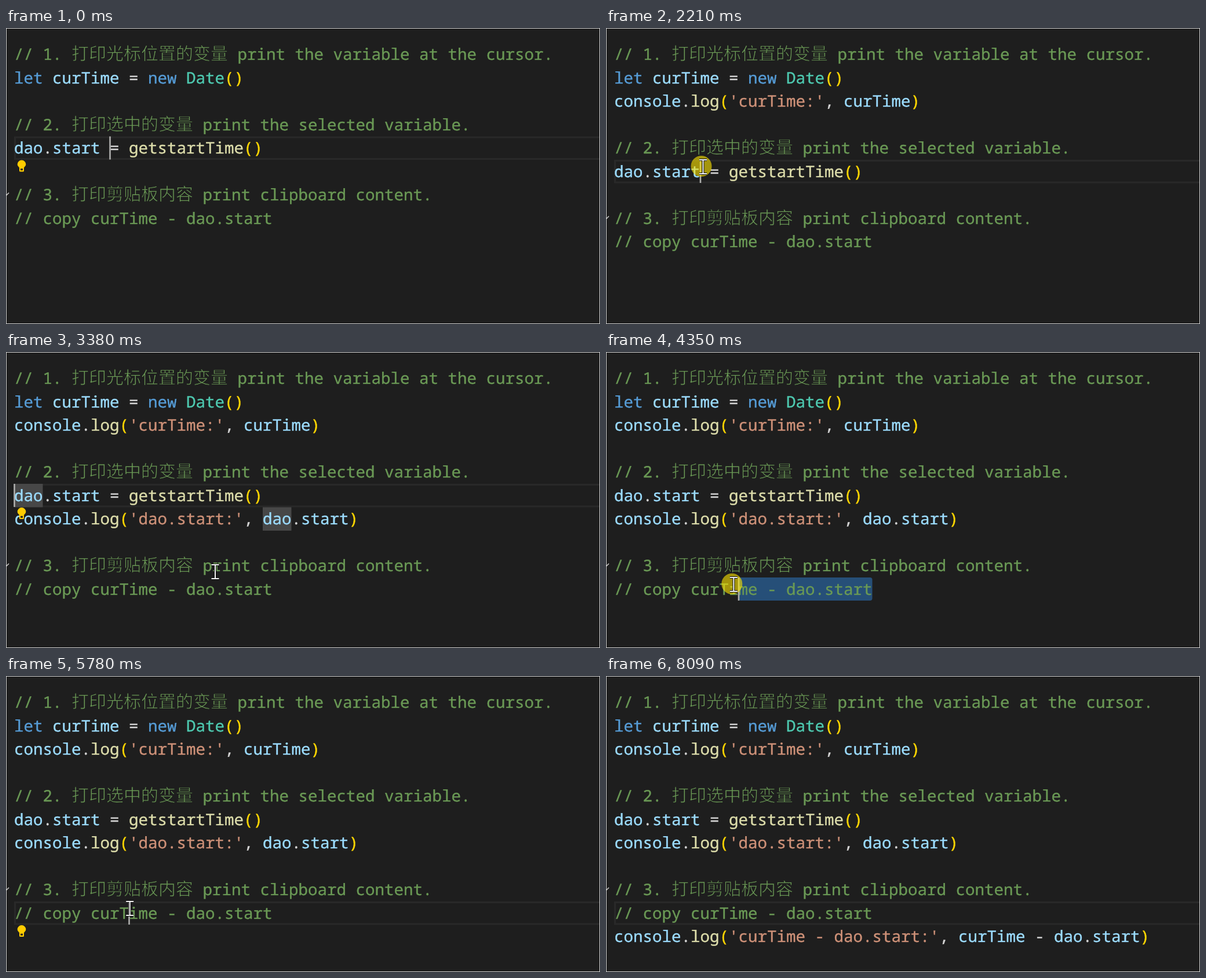
Recreate the animation shown at these times as an HTML page. Size 1025 px wide and 512 px high, loop 8680 ms.

```html
<!DOCTYPE html>
<html lang="zh">
<head>
<meta charset="utf-8">
<title>Print variables</title>
<style>
  html, body { margin: 0; width: 100%; height: 100%; overflow: hidden; background: #1e1e1e; }
  svg { display: block; width: 100%; height: 100%; }
  text {
    font: 27.5px "Noto Sans Mono", "DejaVu Sans Mono", monospace;
    white-space: pre;
    text-rendering: geometricPrecision;
  }
  tspan { fill: currentColor; stroke: currentColor; stroke-width: .4px; }
  /* the background-coloured outline thins the strokes */
  .cjk { font: 300 30px "Noto Sans CJK SC", "Noto Sans CJK", sans-serif; stroke: #1e1e1e; stroke-width: .8px; }
  .comment, .cjk { color: #6a9955; }
  .keyword { color: #569cd6; }
  .type { color: #4ec9b0; }
  .call { color: #dcdcaa; }
  .name { color: #9cdcfe; }
  .string { color: #ce9178; }
  .paren { color: #ffd700; }
  .plain { color: #d4d4d4; }
</style>
</head>
<body>
<svg id="stage" viewBox="0 0 1025 512"></svg>
<script>
const LOOP = 8680, FRAME = 69;
const LEFT = 14, CHAR = 16.5, TOP = 25.5, ROW = 40.5;
const DRAG_SPEED = .445;  // px per ms
const CLICK = 140;        // shortest time the button is held
const DELAY = 270;        // wait for the light bulb and word marks
const HOTSPOT = { x: 5, y: 12 };

const code = text => ({ text, born: 0 });
const log = (value, born) => ({ text: `console.log('${value}:', ${value})`, born });
const LINES = [
  code("// 1. 打印光标位置的变量 print the variable at the cursor."),
  code("let curTime = new Date()"),
  log("curTime", 1520),
  code(""),
  code("// 2. 打印选中的变量 print the selected variable."),
  code("dao.start = getstartTime()"),
  log("dao.start", 2910),
  code(""),
  code("// 3. 打印剪贴板内容 print clipboard content."),
  code("// copy curTime - dao.start"),
  log("curTime - dao.start", 6590)
];

// Presses of the button: the mouse is dragged through cols, then rests until leave.
const START = { at: -800, line: 5, cols: [10] };
const PRESSES = [
  { at: 690, line: 1, cols: [9], leave: 830 },
  { at: 2210, line: 5, cols: [9, 0], leave: 2770 },
  { at: 3800, line: 9, cols: [27, 4.8, 8], leave: 5290 },
  { at: 5640, line: 9, cols: [11.8], leave: 5920 }
];

// Where the mouse goes between presses: [time, x, y]
const WANDER = [
  [130, 796, 426], [1240, 244, 143], [3380, 361, 380],
  [6120, 241, 404], [6990, 241, 404], [7550, 1000, 488]
];

const colX = col => LEFT + col * CHAR;
const snap = col => Math.ceil(col - .05);
const topOf = (line, t) => TOP + ROW * LINES.slice(0, line).filter(l => l.born <= t).length;

function dragPoints(press) {
  const { cols, line, leave } = press;
  const y = topOf(line, press.at) + HOTSPOT.y;
  let t = press.at;
  const points = cols.map((col, i) => {
    if (i) t += Math.abs(col - cols[i - 1]) * CHAR / DRAG_SPEED;
    return [t, colX(col) + HOTSPOT.x, y];
  });
  press.end = t;
  return [...points, [leave, points.at(-1)[1], y]];
}
START.end = START.at;
const PATH = [...WANDER, ...PRESSES.flatMap(dragPoints)].sort((a, b) => a[0] - b[0]);
const MOUSE_OUT = PATH.at(-1)[0] + FRAME;

// The mouse advances in screen-capture steps along straight pieces.
function mouseAt(t) {
  const i = Math.max(0, PATH.findLastIndex(k => k[0] <= t));
  const a = PATH[i], b = PATH[i + 1];
  if (!b || t < a[0]) return a.slice(1);
  const span = b[0] - a[0];
  const n = Math.max(1, Math.round(span / FRAME));
  const p = Math.floor((t - a[0]) / span * n + 1e-6) / n;
  return [a[1] + (b[1] - a[1]) * p, a[2] + (b[2] - a[2]) * p];
}

function editorAt(t) {
  const press = PRESSES.findLast(p => p.at <= t) || START;
  const { line, cols, end } = press;
  const dragging = t < end;
  const anchor = snap(cols[0]);
  const inserted = Math.max(...LINES.map(l => l.born <= t ? l.born : 0));
  const raw = dragging ? (mouseAt(t)[0] - HOTSPOT.x - LEFT) / CHAR : cols.at(-1);
  const col = Math.min(anchor, snap(raw));
  return {
    line, col, anchor, dragging,
    selected: col < anchor && inserted < press.at,
    since: inserted > end ? inserted : end
  };
}

function tokens(text) {
  if (text.startsWith("//")) {
    return text.split(/([\u4e00-\u9fff]+)/).map((s, i) => [i % 2 ? "cjk" : "comment", s]);
  }
  const parts = text.match(/'[^']*'|\w+\(?|[()]|[^\w'()]+/g) || [];
  return parts.flatMap(s => {
    if (s[0] === "'") return [["string", s]];
    if (/^[()]$/.test(s)) return [["paren", s]];
    if (/^(let|new)$/.test(s)) return [["keyword", s]];
    if (s.endsWith("(")) {
      const name = s.slice(0, -1);
      return [[name === "Date" ? "type" : "call", name], ["paren", "("]];
    }
    return [[/^\w/.test(s) ? "name" : "plain", s]];
  });
}

const stage = document.getElementById("stage");
function set(node, attrs) {
  for (const key in attrs) node.setAttribute(key, attrs[key]);
  return node;
}
function add(tag, attrs, parent = stage) {
  const node = document.createElementNS("http://www.w3.org/2000/svg", tag);
  return parent.appendChild(set(node, attrs));
}
const show = (node, on) => { node.style.display = on ? "" : "none"; };

// Layers, back to front
const current = add("rect", { x: 15.5, width: 1020, height: 37.5, fill: "none", stroke: "#292929", "stroke-width": 3 });
const marks = add("g", {});
const selection = add("rect", { height: 40, rx: 4, fill: "#264f78" });
const names = [];
const lines = LINES.map(({ text }, line) => {
  const node = add("text", {});
  let x = LEFT, col = 0;
  for (const [kind, s] of tokens(text)) {
    add("tspan", { class: kind, x }, node).textContent = s;
    if (kind === "name") {
      const fill = text.startsWith("let") ? "#083d5a" : "#474747";
      const box = add("rect", { x, width: s.length * CHAR, height: ROW, fill }, marks);
      names.push({ word: s, line, col, box });
    }
    x += s.length * (kind === "cjk" ? 30 : CHAR);
    col += s.length;
  }
  return node;
});
const chevron = add("path", { d: "M0 21.5L5 16.5", stroke: "#c5c5c5", "stroke-width": 1.6 });
const bulb = add("g", {});
add("path", { d: "M23 14.5C23 12 19.7 11.5 19.7 7.8A7.3 7.3 0 0 1 34.3 7.8C34.3 11.5 31 12 31 14.5V19Q31 20.5 29.5 20.5H24.5Q23 20.5 23 19Z", fill: "#ffcc00" }, bulb);
add("path", { d: "M25 15.2H29V18.2H25Z", fill: "#1e1e1e" }, bulb);
const caret = add("rect", { width: 2.6, height: 40, fill: "#aeafad" });
const mouse = add("g", {});
const halo = add("circle", { cx: -3, cy: -1, r: 18, fill: "#ffe600", "fill-opacity": .6 }, mouse);
for (const [stroke, width] of [["#111", 4], ["#f4f4f4", 2]]) {
  add("path", { d: "M-6.5 -12H6.5M0 -12V12M-6.5 12H6.5", stroke, "stroke-width": width }, mouse);
}
add("rect", { x: .5, y: .5, width: 1024, height: 511, fill: "none", stroke: "#d2d2d2" });

function draw(t) {
  const tops = LINES.map((_, i) => topOf(i, t));
  LINES.forEach(({ born }, i) => {
    show(lines[i], t >= born);
    set(lines[i], { y: Math.floor(tops[i] + 30) });
  });
  set(chevron, { transform: `translate(0 ${tops[8]})` });

  const now = editorAt(t);
  const top = tops[now.line];
  const solid = now.dragging || (t - now.since) % 1000 < 500;
  show(caret, solid && t < LOOP - CLICK);
  set(caret, { x: colX(now.col) - .8, y: top });
  show(current, !now.selected);
  set(current, { y: top + 1.5 });
  show(selection, now.selected);
  set(selection, { x: colX(now.col), y: top, width: (now.anchor - now.col) * CHAR });

  // The bulb and the word marks answer to the editor as it was a moment ago.
  const then = editorAt(t - DELAY);
  const settled = !then.dragging && then.line === now.line;
  const isCode = !LINES[now.line].text.startsWith("//");
  show(bulb, settled && (then.selected || isCode));
  set(bulb, { transform: `translate(0 ${top + ROW})` });

  const target = settled && !then.selected && names.find(n =>
    n.line === now.line && n.col <= then.col && then.col <= n.col + n.word.length);
  for (const { word, line, box } of names) {
    show(box, target && word === target.word && t >= LINES[line].born);
    set(box, { y: tops[line] });
  }

  const [mx, my] = mouseAt(t);
  show(mouse, t >= PATH[0][0] && t < MOUSE_OUT);
  set(mouse, { transform: `translate(${mx} ${my})` });
  show(halo, PRESSES.some(p => t >= p.at && t < Math.max(p.end, p.at + CLICK)));
}

const start = performance.now();
function tick() {
  draw((performance.now() - start) % LOOP);
  requestAnimationFrame(tick);
}
tick();
</script>
</body>
</html>
```
